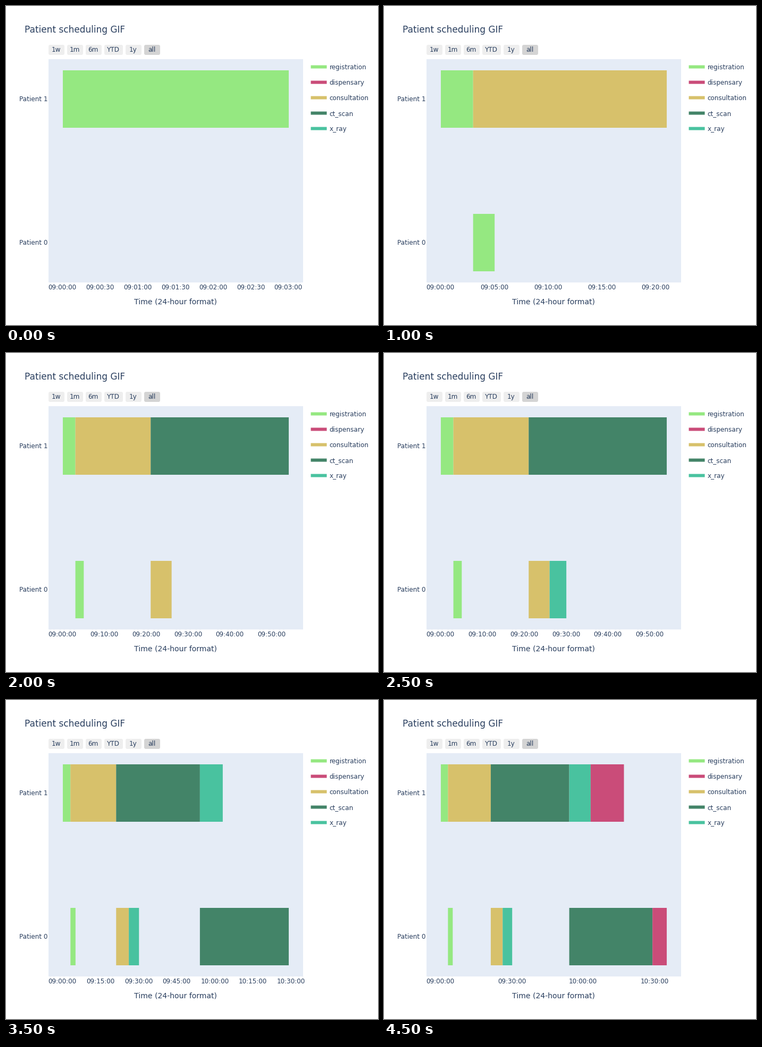
A matplotlib script for the animation above (5 s loop, 700 by 600 pixels).

```python
import matplotlib.pyplot as plt
from matplotlib.animation import FuncAnimation
from matplotlib.patches import FancyBboxPatch, Rectangle

W, H, DPI = 700, 600, 100
INK = "#2a3f5f"
LEFT, SPAN = 106.95, 425.1      # pixel place of 09:00 and width of the schedule
PLOT_RIGHT = 559
ROW_TOP = {1: 121, 0: 391}
BAR_H = 108
STEPS = (0.5, 1, 2, 5, 10, 15, 30)

COLORS = {
    "registration": "#95e881",
    "dispensary": "#ca4c79",
    "consultation": "#d7c16b",
    "ct_scan": "#438468",
    "x_ray": "#49c29f",
}

# patient, department, start and end in minutes after 09:00
TASKS = [
    (1, "registration", 0, 3),
    (1, "consultation", 3, 21),
    (0, "registration", 3, 5),
    (0, "consultation", 21, 26),
    (1, "ct_scan", 21, 54),
    (0, "x_ray", 26, 30),
    (0, "ct_scan", 54, 89),
    (1, "x_ray", 54, 63),
    (1, "dispensary", 63, 77),
    (0, "dispensary", 89, 95),
]

plt.rcParams["font.family"] = "DejaVu Sans"
fig = plt.figure(figsize=(W / DPI, H / DPI), dpi=DPI, facecolor="white")
ax = fig.add_axes([0, 0, 1, 1])
ax.set_xlim(0, W)
ax.set_ylim(H, 0)
ax.axis("off")


def text(x, y, s, px=12, ha="left"):
    # centring uses the ink width, so allow for the side bearings
    if ha == "center":
        x -= 0.06 * px
    return ax.text(x, y, s, size=px * 72 / DPI, color=INK, ha=ha, va="baseline")


def rect(x, y, w, h, color):
    return ax.add_patch(Rectangle((x, y), w, h, fc=color, lw=0, snap=False))


def clock(minutes):
    sec = round(minutes * 60)
    return f"{9 + sec // 3600:02d}:{sec // 60 % 60:02d}:{sec % 60:02d}"


def draw_static():
    rect(80, 100, 479, 420, "#e5ecf6")
    text(35, 50, "Patient scheduling GIF", 17)
    text(319.5, 561, "Time (24-hour format)", 14, "center")
    for patient, top in ROW_TOP.items():
        text(25.2, top + 58, f"Patient {patient}")

    x = 80
    for label in ("1w", "1m", "6m", "YTD", "1y", "all"):
        w = 35 if label == "YTD" else 30
        color = "#d4d4d4" if label == "all" else "#eeeeee"
        ax.add_patch(FancyBboxPatch((x, 73), w, 19, fc=color, lw=0, snap=False,
                                    boxstyle="round,pad=0,rounding_size=3"))
        text(x + w / 2, 86, label, ha="center")
        x += w + 5

    for i, (name, color) in enumerate(COLORS.items()):
        y = 114.5 + 29 * i
        rect(573.58, y - 3, 30, 6, color)
        text(608.4, y + 4.5, name)


draw_static()
moving = []


def update(n):
    while moving:
        moving.pop().remove()
    shown = TASKS[:n + 1]
    end = max(task[3] for task in shown)
    scale = SPAN / end

    for patient, dept, start, stop in shown:
        moving.append(rect(LEFT + start * scale, ROW_TOP[patient],
                           (stop - start) * scale, BAR_H, COLORS[dept]))

    step = next(s for s in STEPS if end / s <= 6)
    tick = 0
    while LEFT + tick * scale <= PLOT_RIGHT:
        moving.append(text(LEFT + tick * scale, 533, clock(tick), ha="center"))
        tick += step
    return moving


anim = FuncAnimation(fig, update, frames=len(TASKS), interval=500,
                     init_func=lambda: [], repeat=True, repeat_delay=0)
plt.show()
```
